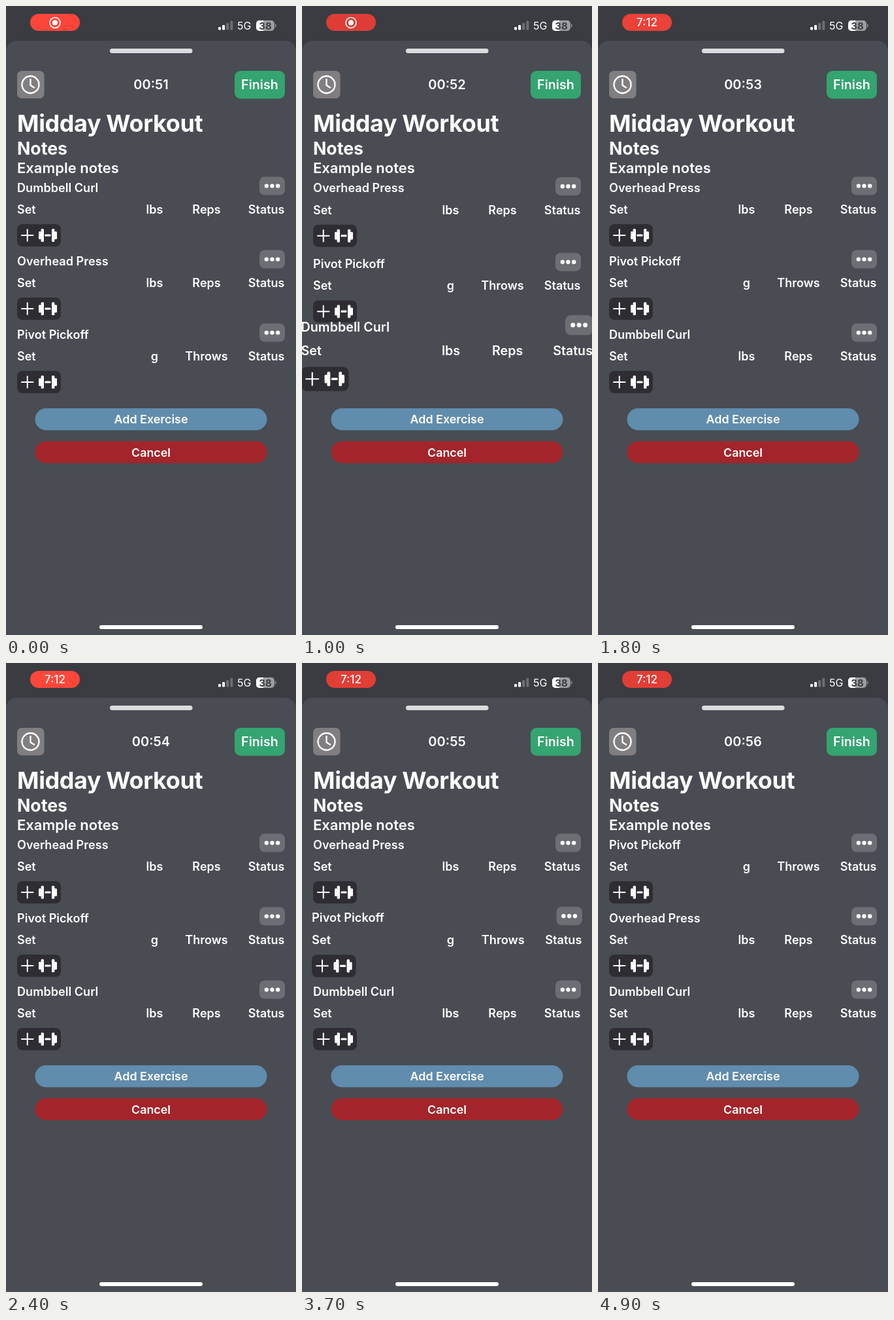
Animation, 444 px wide and 960 px high, one loop 5000 ms. Source, as an HTML page with a canvas:

```html
<!DOCTYPE html>
<html lang="en">
<head>
<meta charset="utf-8">
<title>Workout</title>
<style>
html, body { margin: 0; width: 100%; height: 100%; overflow: hidden; background: #3a3c41; }
canvas { display: block; width: 444px; height: 960px; }
</style>
</head>
<body>
<canvas id="stage"></canvas>
<script>
const W = 444, H = 960, LOOP = 5000, STEP = 100;
const SLOT = 112, MID_X = 222, ROW_MID = 314, LIFT = 0.09;
const canvas = document.getElementById('stage');
const ctx = canvas.getContext('2d');
const dpr = window.devicePixelRatio || 1;
canvas.width = W * dpr;
canvas.height = H * dpr;

const clamp = v => Math.max(0, Math.min(1, v));
const ease = (t, a, b) => { const u = clamp((t - a) / (b - a)); return u * u * (3 - 2 * u); };
// critically damped spring from 0 to 1
const spring = (t, start) => {
  const x = Math.max(0, t - start) * 12;
  return 1 - (1 + x) * Math.exp(-x);
};

function box(x, y, w, h, r, fill) {
  ctx.fillStyle = fill;
  ctx.beginPath();
  ctx.roundRect(x, y, w, h, r);
  ctx.fill();
}

function dot(x, y, r, fill = '#fff') {
  ctx.fillStyle = fill;
  ctx.beginPath();
  ctx.arc(x, y, r, 0, Math.PI * 2);
  ctx.fill();
}

function line(width, ...pts) {
  ctx.strokeStyle = '#fff';
  ctx.lineWidth = width;
  ctx.lineCap = ctx.lineJoin = 'round';
  ctx.beginPath();
  pts.forEach(([x, y]) => ctx.lineTo(x, y));
  ctx.stroke();
}

function ring(x, y, r, width) {
  ctx.strokeStyle = '#fff';
  ctx.lineWidth = width;
  ctx.beginPath();
  ctx.arc(x, y, r, 0, Math.PI * 2);
  ctx.stroke();
}

function text(str, x, y, size, weight = 600, align = 'left', fill = '#fff', spacing = 0) {
  ctx.font = `${weight} ${size}px Inter, "Liberation Sans", sans-serif`;
  ctx.letterSpacing = spacing + 'px';
  ctx.textAlign = align;
  ctx.fillStyle = fill;
  ctx.fillText(str, x, y);
}

function statusBar(t) {
  const dim = clamp(0.6 - 0.9 * Math.cos((t - 0.3) * Math.PI));
  const mix = (a, b) => Math.round(a + (b - a) * dim);
  box(37, 12, 76, 26, 13, `rgb(${mix(255, 221)},${mix(70, 61)},${mix(58, 54)})`);
  if (t < 1.5) {
    ring(75, 25.5, 8, 1.6);
    dot(75, 25.5, 4);
  } else {
    text('7:12', 75, 31.2, 17, 500, 'center');
  }
  for (let i = 0; i < 4; i++) {
    const h = 4.5 + i * 3;
    box(325 + i * 6.1, 36.5 - h, 4, h, 1.2, i < 2 ? '#fff' : '#6c6e72');
  }
  text('5G', 354, 36, 16, 400);

  ctx.save();
  ctx.beginPath();
  ctx.roundRect(383, 22, 28, 16, 5);
  ctx.clip();
  box(383, 22, 28, 16, 0, '#9d9ea1');
  box(383, 22, 11, 16, 0, '#fff');
  ctx.restore();
  box(412, 27.5, 1.6, 5, 0.8, '#8a8b8e');
  text('38', 397, 35.5, 15, 700, 'center', '#3a3c41');
}

function header(t) {
  box(159, 65, 126.5, 7, 3.5, '#dcdcde');
  box(17, 99, 41.5, 42, 7, '#807e81');
  ring(37.5, 120, 13, 2.4);
  line(2.4, [37.5, 112], [37.5, 121], [43, 124.5]);
  const secs = 51 + Math.floor(t + 0.75);
  text('00:' + secs, 222, 127.2, 20, 600, 'center');
  box(350, 99, 77, 42.5, 9, '#34a470');
  text('Finish', 388.5, 127.2, 19.7, 600, 'center');
  text('Midday Workout', 17, 192, 36, 700, 'left', '#fff', -0.4);
  text('Notes', 17, 227, 26.7, 700);
  text('Example notes', 17, 255, 22);
}

function dumbbell(x, y) {
  box(x - 4.5, y - 1.6, 9, 3.2, 1.2, '#fff');
  for (const s of [-1, 1]) {
    box(x + s * 8.2 - 2.2, y - 10, 4.4, 20, 1.6, '#fff');
    box(x + s * 12 - 2, y - 6, 4, 12, 1.6, '#fff');
  }
}

function row(item, y, lift = 0) {
  const scale = 1 + LIFT * lift;
  ctx.save();
  ctx.translate(MID_X, ROW_MID + y);
  ctx.scale(scale, scale);
  ctx.translate(-MID_X, -ROW_MID);
  text(item.name, 17, 283.7, 18.1);
  box(388, 260.5, 39, 28, 8, 'rgba(255,255,255,0.19)');
  for (let i = -1; i < 2; i++) dot(407.5 + i * 8.7, 274.6, 3.2);
  text('Set', 17, 317, 18);
  text(item.unit, 227.5, 317, 18, 600, 'center');
  text(item.count, 307, 317, 18, 600, 'center');
  text('Status', 426.5, 317, 18, 600, 'right');
  box(17, 333, 67, 34, 8, 'rgba(24,20,26,0.55)');
  line(2, [24, 350], [41.5, 350]);
  line(2, [32.75, 341.3], [32.75, 358.7]);
  dumbbell(64, 350);
  ctx.restore();
}

const curl = { name: 'Dumbbell Curl', unit: 'lbs', count: 'Reps' };
const press = { name: 'Overhead Press', unit: 'lbs', count: 'Reps' };
const pickoff = { name: 'Pivot Pickoff', unit: 'g', count: 'Throws' };

function list(t) {
  if (t < 2.5) {
    const drop = ease(t, 1.1, 1.4);
    row(press, SLOT * (1 - spring(t, 0.4)));
    row(pickoff, SLOT * (2 - spring(t, 0.575)));
    row(curl, 216 * ease(t, 0.2, 0.8) + 8 * drop, ease(t, 0, 0.25) - drop);
  } else {
    const drop = ease(t, 4.5, 4.8);
    row(curl, SLOT * 2);
    row(press, SLOT * spring(t, 4.14));
    row(pickoff, SLOT * (1 - ease(t, 3.9, 4.4)), ease(t, 3.65, 3.9) - drop);
  }
}

function button(label, y, fill) {
  box(44.5, y, 355, 33.5, 16.75, fill);
  text(label, 222, y + 23.3, 17.9, 600, 'center');
}

function draw(t) {
  ctx.setTransform(dpr, 0, 0, dpr, 0, 0);
  box(0, 0, W, H, 0, '#3a3c41');
  box(0, 53, W, H, 16, '#494c53');
  statusBar(t);
  header(t);
  button('Add Exercise', 614, '#608cae');
  button('Cancel', 664.3, '#a3252b');
  list(t);
  box(143, 945, 158, 6, 3, '#fff');
}

const start = performance.now();
function tick() {
  const ms = (performance.now() - start) % LOOP;
  draw(Math.floor(ms / STEP) * STEP / 1000);
  requestAnimationFrame(tick);
}
tick();
</script>
</body>
</html>
```
